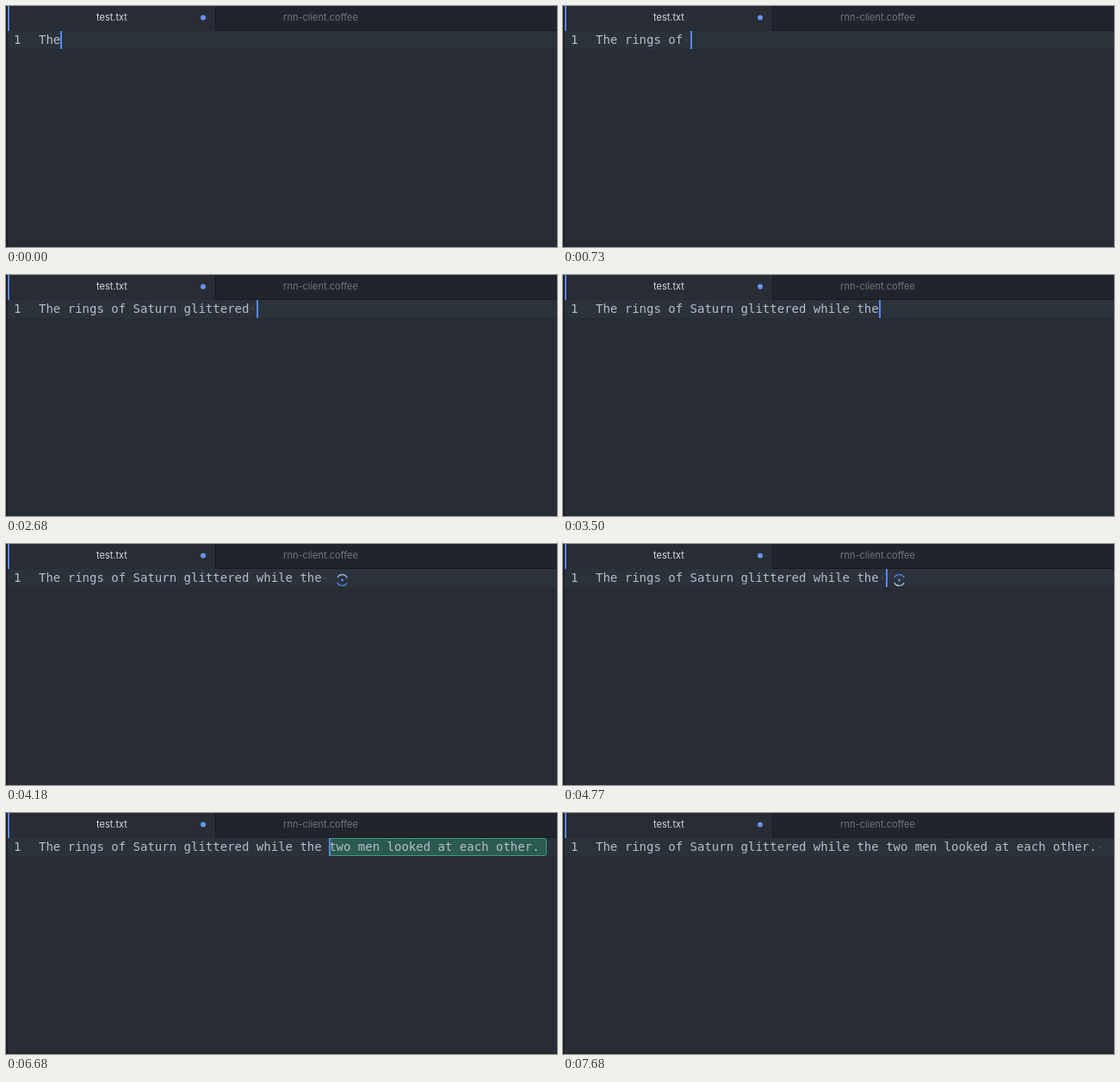
Animation of 640 by 280 pixels, one loop 8 s. Source, as an HTML page:

```html
<!DOCTYPE html>
<html lang="en">
<head>
<meta charset="utf-8">
<title>Editor autocomplete</title>
<style>
  html, body { margin: 0; width: 100%; height: 100%; overflow: hidden; background: #282c34; }
  svg { display: block; }
  text { white-space: pre; }
  .tab { font: 11px Inter, "Open Sans", sans-serif; text-anchor: middle; }
  .code { font: 14px "DejaVu Sans Mono", "Noto Sans Mono", monospace; fill: #b7bdc8; }
  .mark { fill: #2b5a50; stroke: #3c9c80; }
</style>
</head>
<body>
<svg width="640" height="280" viewBox="0 0 640 280">
  <rect width="640" height="280" fill="#282c34"/>
  <rect x="243" width="397" height="29" fill="#21252b"/>
  <rect x="243" width="1" height="29" fill="#181a1f"/>
  <rect x="243" y="28" width="397" height="1" fill="#181a1f"/>
  <rect width="1" height="280" fill="#21252b"/>
  <rect x="1" width="1" height="280" fill="#181a1f"/>
  <rect x="2" width="2" height="29" fill="#568af2"/>
  <rect x="2" y="29" width="638" height="21" fill="#2c323c"/>
  <text class="tab" x="123" y="17" fill="#d7dae0">test.txt</text>
  <text class="tab" x="365.5" y="17" fill="#6f757f">rnn-client.coffee</text>
  <circle cx="229" cy="13.5" r="3" fill="#6494ed"/>
  <text class="code" x="9" y="44">1</text>
  <rect class="mark" id="mark1" x="375.5" y="29.5" height="20" rx="2.5"/>
  <rect class="mark" id="mark2" x="38.5" y="50.5" height="20" rx="2.5"/>
  <text class="code" id="row1" x="38" y="44"></text>
  <text class="code" id="row2" x="38" y="65"></text>
  <text class="code" id="wrap" x="9" y="65">•</text>
  <circle id="space" r="0.9" fill="#565d69"/>
  <g id="spinner" fill="none" stroke-width="1.3">
    <circle cx="390.5" cy="42" r="1.4" fill="#568af2"/>
    <g id="ring">
      <path d="M384.8 39.1A6.4 6.4 0 0 1 396.2 39.1" stroke="#568af2"/>
      <path d="M384.8 44.9A6.4 6.4 0 0 0 396.2 44.9" stroke="#a9bfe8"/>
    </g>
  </g>
  <rect id="cursor" y="29" width="2" height="21" fill="#528bff"/>
</svg>
<script>
const LOOP = 8000, LEFT = 38, CHAR = 8.428;
const TYPED = "The rings of Saturn glittered while the ";

// [time, characters typed], even typing in between
const KEYS = [
  [0, 3], [50, 4], [680, 13], [820, 14], [860, 15], [1600, 23], [1730, 24],
  [2140, 27], [2320, 28], [2500, 29], [2870, 33], [3050, 34], [3460, 39], [3590, 40]
];
// [time, first row, wrapped row]
const HINTS = [
  [5000, "same stars were moving through ", "the darkness. "],
  [5590, "two men were climbing higher. ", ""],
  [6000, "two men looked at each other. ", ""]
];
const SPIN = [3680, 5000], ACCEPT = 7180;
const CURSOR_OFF = [[4090, 4590], [5090, 5590], [6090, 6500], [7000, 7180], [7680, 8000]];

const el = Object.fromEntries([...document.querySelectorAll("[id]")].map(e => [e.id, e]));
const colX = n => LEFT + n * CHAR;
const within = (t, [a, b]) => t >= a && t < b;
const show = (e, on) => e.setAttribute("visibility", on ? "visible" : "hidden");

function setText(e, s) {
  if (e.textContent !== s) e.textContent = s;
}

function typedCount(t) {
  const i = KEYS.findIndex(k => k[0] > t);
  if (i < 0) return TYPED.length;
  const [t0, n0] = KEYS[i - 1], [t1, n1] = KEYS[i];
  return Math.floor(n0 + (n1 - n0) * (t - t0) / (t1 - t0) + 1e-6);
}

function draw(t) {
  const count = typedCount(t);
  const [, first, second] = HINTS.filter(h => t >= h[0]).pop() || [0, "", ""];
  const line = TYPED.slice(0, count) + first;
  const accepted = t >= ACCEPT;
  const marked = first !== "" && !accepted;
  const last = second || line;

  setText(el.row1, line);
  setText(el.row2, second);
  show(el.wrap, second !== "");

  show(el.mark1, marked);
  show(el.mark2, marked && second !== "");
  el.mark1.setAttribute("width", second ? 264 : Math.round(first.length * CHAR) - 1);
  el.mark2.setAttribute("width", Math.max(0, Math.round(second.length * CHAR) - 1));

  show(el.space, last.endsWith(" "));
  el.space.setAttribute("cx", colX(last.length - 0.5));
  el.space.setAttribute("cy", second ? 60.5 : 39.5);

  show(el.spinner, within(t, SPIN));
  el.ring.setAttribute("transform", `rotate(${(t - 4770) * 0.3} 390.5 42)`);

  show(el.cursor, !CURSOR_OFF.some(span => within(t, span)));
  el.cursor.setAttribute("x", Math.round(colX(accepted ? line.length : count)));
}

const start = performance.now();
function tick() {
  draw((performance.now() - start) % LOOP);
  requestAnimationFrame(tick);
}
tick();
</script>
</body>
</html>
```
